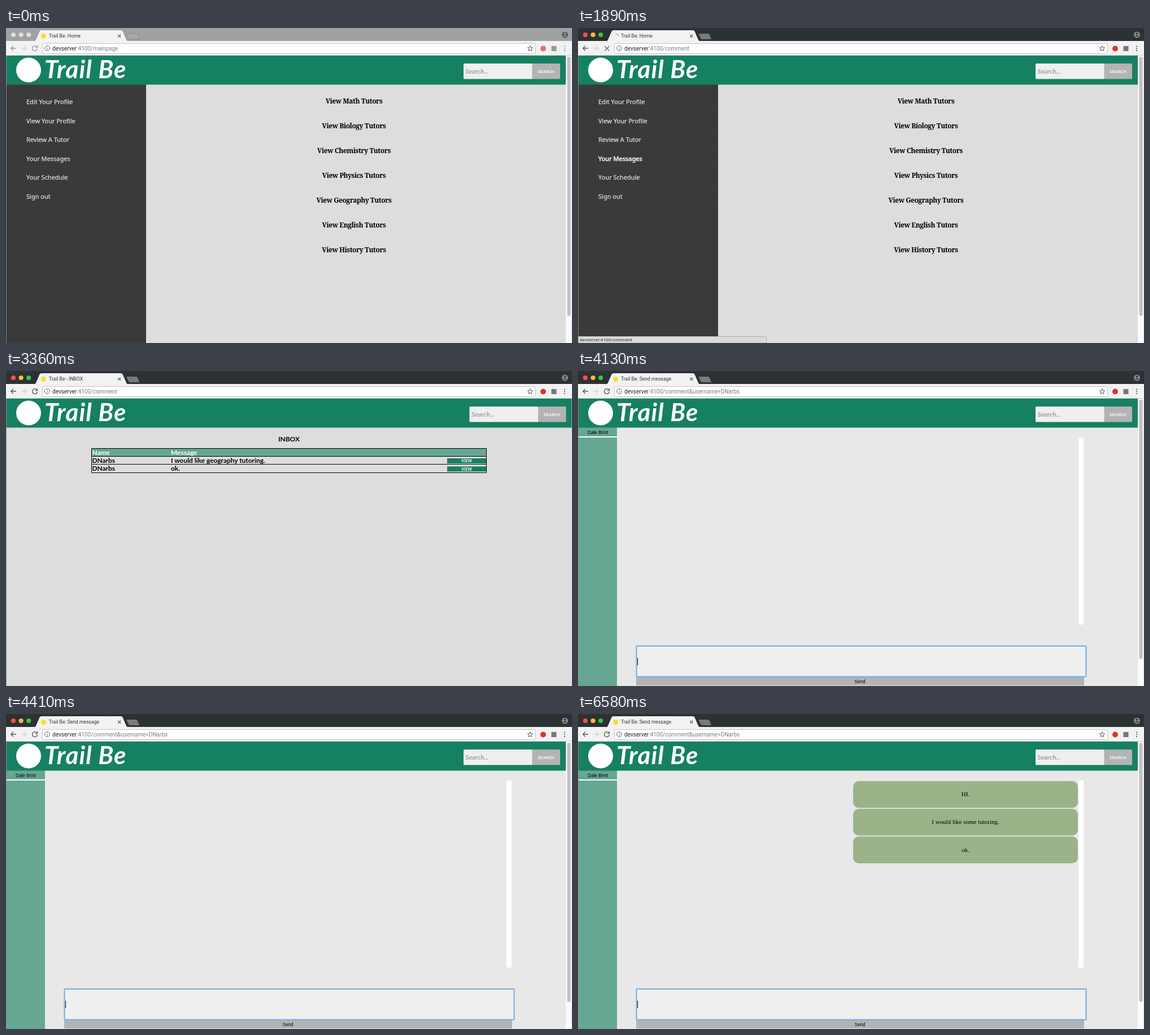
These frames come from a looping animation (1002 by 559 pixels, 6.65 s). An HTML page:

```html
<!DOCTYPE html>
<html lang="en">
<head>
<meta charset="utf-8">
<title>Tutoring site walkthrough</title>
<style>
  html, body { margin: 0; width: 100%; height: 100%; overflow: hidden; }
  svg { display: block; width: 100vw; height: 100vh; }
  .ui { font-family: Roboto, sans-serif; font-size: 8.6px; fill: #333; }
  .url { font-size: 10px; fill: #7d7d7d; }
  .menu { font: 500 11px "Noto Sans", sans-serif; }
  .menu text { fill: #dedede; stroke: #dedede; stroke-width: .25; }
  .menu text.hover { fill: #fff; stroke: #fff; stroke-width: .5; }
  .subject { font: 700 12px "Noto Serif", serif; letter-spacing: -.43px; }
  .table { font: 700 11.9px Lato, sans-serif; }
  .chat { font: 11px "Liberation Serif", serif; }
  .small { font: 8.2px "Liberation Sans", sans-serif; }
  .button { font: 700 7.3px Lato, sans-serif; fill: #fff; }
  .brand { font: italic 700 44px Lato, sans-serif; letter-spacing: 1px; fill: #fff; }
  .mid { text-anchor: middle; }
  .line { fill: none; stroke-width: 1.3; }
</style>
</head>
<body>
<svg viewBox="0 0 1002 559" preserveAspectRatio="none">
  <g id="home">
    <rect y="100" width="1002" height="459" fill="#ddd"/>
    <rect y="100" width="248" height="459" fill="#3a3a3a"/>
    <g id="menu" class="menu"></g>
    <g id="subjects" class="subject mid"></g>
  </g>

  <g id="inbox">
    <rect y="100" width="1002" height="459" fill="#ddd"/>
    <g class="table">
      <text class="mid" x="501" y="124.5">INBOX</text>
      <rect x="151" y="137" width="700" height="14.5" fill="#66a793"/>
      <path d="M151.5 137.5H850.5V180.5H151.5ZM151 151.5H851M151 165.5H851" fill="none" stroke="#000"/>
      <g fill="#fff"><text x="152.5" y="148.5">Name</text><text x="292" y="148.5">Message</text></g>
      <g id="letters"></g>
    </g>
  </g>

  <g id="chat">
    <rect y="100" width="1002" height="459" fill="#e8e8e8"/>
    <rect y="100" width="69" height="459" fill="#66a793"/>
    <rect y="116" width="69" height="2" fill="#fff"/>
    <text class="small mid" x="35" y="111.5">Dale Brint</text>
    <rect x="886" y="118" width="9" height="332" fill="#fff"/>
    <g id="bubbles" class="chat mid"></g>
    <rect x="103" y="543" width="793" height="15" fill="#b3b3b3"/>
    <text class="small mid" x="499" y="553.7">Send</text>
    <rect x="103.5" y="488" width="796" height="54.5" rx="1" fill="#efefef" stroke="#6caee8" stroke-width="2"/>
    <path id="caret" d="M105.5 509V522" stroke="#000"/>
  </g>

  <rect y="49" width="1002" height="51.5" fill="#168062"/>
  <circle cx="40" cy="74.5" r="22" fill="#fff"/>
  <text class="brand" x="68" y="89">Trail Be</text>
  <g id="search">
    <rect x="810" y="63" width="122" height="27.5" rx="1.5" fill="#efefef"/>
    <rect x="931.5" y="63" width="49.5" height="27.5" rx="1.5" fill="#b3b3b3"/>
    <text x="813.5" y="80.5" fill="#a0a0a0" style="font:italic 700 11.5px Lato,sans-serif">Search...</text>
    <text class="mid" x="956" y="79.8" fill="#fff" style="font:500 7.8px Roboto,sans-serif">SEARCH</text>
  </g>
  <g id="scrollbar">
    <rect x="991" y="49" width="11" height="510" fill="#fafafa"/>
    <rect x="993.5" y="51" width="6" height="460" rx="3" fill="#c1c1c1"/>
  </g>

  <rect id="titlebar" width="1002" height="24"/>
  <g id="lights"></g>
  <path id="newTab" d="M215 10H230Q232 10 233 12L236 20H219Q218 20 217 18L213.5 11Q213.5 10 215 10Z"/>
  <rect y="23" width="1002" height="26" fill="#f2f2f2"/>
  <path d="M0 48.5H1002" stroke="#cfcfcf"/>
  <path d="M50 23.5Q52 23 53 21L59 7Q60 4 63 4H203Q206 4 207 7L213 21Q214 23 216 23.5Z" fill="#f2f2f2"/>
  <circle id="favicon" cx="66.5" cy="14.5" r="4.5" fill="#f5df2e"/>
  <path id="spinner" class="line" d="M67 10A4.5 4.5 0 0 1 71.5 14.5" stroke="#aaa"/>
  <text id="title" class="ui" x="76" y="17.3"></text>
  <path class="line" d="M198.3 11.7L203.3 16.7M203.3 11.7L198.3 16.7" stroke="#666"/>
  <circle id="user" cx="989.5" cy="12" r="5.5"/>
  <path id="person" d="M986 15Q989.5 11 993 15ZM987.8 10A1.7 1.7 0 0 1 991.2 10A1.7 1.7 0 0 1 987.8 10Z"/>

  <g class="line">
    <path id="back" d="M18 36H9M13 31.8L8.8 36L13 40.2"/>
    <path d="M27 36H36M32 31.8L36.2 36L32 40.2" stroke="#d2d2d2"/>
    <path id="reload" d="M54.5 33.2A4.5 4.5 0 1 0 55.5 37M55.5 31V34.5H52"/>
    <path id="stop" d="M47 32L55.5 40.5M55.5 32L47 40.5" stroke="#666"/>
  </g>
  <rect x="64.5" y="27.5" width="873" height="18" rx="2" fill="#fff" stroke="#c4c4c4"/>
  <circle cx="73" cy="36" r="4.5" fill="none" stroke="#666"/>
  <path d="M73 35.3V38.8M73 33V34.3" stroke="#666"/>
  <text class="ui url" x="82" y="39.7"><tspan fill="#222">devserver</tspan><tspan id="path"></tspan></text>
  <path d="M928 31.5L929.3 34.7L932.7 35L930.1 37.2L930.9 40.5L928 38.7L925.1 40.5L925.9 37.2L923.3 35L926.7 34.7Z" fill="none" stroke="#555"/>
  <circle id="redIcon" cx="951" cy="36.5" r="5"/>
  <rect id="greyIcon" x="965.5" y="32" width="9" height="9"/>
  <g id="dots"><circle cx="989" cy="32.5" r="1.1"/><circle cx="989" cy="36.3" r="1.1"/><circle cx="989" cy="40.1" r="1.1"/></g>

  <g id="status">
    <path d="M0 547.5H331Q333.5 547.5 333.5 550V559H0Z" fill="#dadada" stroke="#b4b4b4"/>
    <text class="ui" x="3" y="556.2" style="font-size:8.1px">devserver:4100/comment</text>
  </g>
  <path d="M.5 49V559" stroke="#8d8d8d"/>
  <path d="M1001.5 49V559" stroke="#d0d0d0" opacity=".6"/>
</svg>

<script>
const LOOP = 6650;
const FOCUS = 1400, HOVER = 1470, LOAD = 1750, INBOX = 2030, CHAT = 3850, MESSAGES = 4550;
const CARET_PHASE = 150;

const $ = id => document.getElementById(id);
const show = (id, on) => $(id).style.display = on ? '' : 'none';
const paint = (id, color, attr = 'fill') => $(id).setAttribute(attr, color);
const write = (id, text) => { if ($(id).textContent !== text) $(id).textContent = text; };
const list = (id, items, draw) => $(id).innerHTML = items.map(draw).join('');

list('menu', ['Edit Your Profile', 'View Your Profile', 'Review A Tutor', 'Your Messages', 'Your Schedule', 'Sign out'],
  (label, i) => `<text x="36" y="${135.2 + 33.5 * i}">${label}</text>
    <path d="M32 ${Math.round(144 + 33.5 * i) + .5}H248" stroke="#424242" stroke-dasharray="3 1"/>`);

list('subjects', ['Math', 'Biology', 'Chemistry', 'Physics', 'Geography', 'English', 'History'],
  (name, i) => `<text x="616" y="${134 + 44 * i}">View ${name} Tutors</text>`);

list('letters', ['I would like geography tutoring.', 'ok.'], (text, i) => {
  const y = 163 + 14.4 * i;
  return `<text x="152.5" y="${y}">DNarbs</text><text x="292" y="${y}">${text}</text>
    <rect x="781" y="${y - 8}" width="69" height="9" fill="#168062"/>
    <text class="button mid" x="815.5" y="${y - .7}">VIEW</text>`;
});

list('bubbles', ['HI.', 'I would like some tutoring.', 'ok.'], (text, i) => {
  const y = 119 + 49.2 * i;
  return `<rect x="487" y="${y}" width="398" height="47.5" rx="10" fill="#9bb388"/>
    <text x="686" y="${y + 27.2}">${text}</text>`;
});

list('lights', ['#fc4f4b', '#fdbc2f', '#33c748'],
  (color, i) => `<circle cx="${13 + 13.6 * i}" cy="12" r="4.1" fill="${color}"/>`);
const lights = [...$('lights').children];
const lightColors = lights.map(light => light.getAttribute('fill'));
const messagesLink = $('menu').querySelectorAll('text')[3];

function render(t) {
  const focused = t >= FOCUS;
  const hovering = t >= HOVER && t < INBOX;
  const loading = t >= LOAD && t < INBOX;
  const page = t < INBOX ? 'home' : t < CHAT ? 'inbox' : 'chat';
  const barColor = focused ? '#2c3134' : '#9fa1a2';
  const iconColor = focused ? '#555' : '#999';

  for (const id of ['home', 'inbox', 'chat']) show(id, id === page);
  show('scrollbar', page !== 'inbox');
  $('search').setAttribute('transform', `translate(${page === 'inbox' ? 10.5 : 0})`);

  paint('titlebar', barColor);
  paint('person', barColor);
  paint('user', focused ? '#85898b' : '#5a5c5e');
  paint('newTab', focused ? '#777b7e' : '#a8aaab');
  paint('newTab', focused ? 'none' : '#858788', 'stroke');
  paint('back', iconColor, 'stroke');
  paint('reload', iconColor, 'stroke');
  paint('dots', iconColor);
  paint('redIcon', focused ? '#d8362f' : '#e2716c');
  paint('greyIcon', focused ? '#777' : '#999');
  lights.forEach((light, i) => light.setAttribute('fill', focused ? lightColors[i] : '#dedede'));

  write('title', { home: 'Trail Be: Home', inbox: 'Trail Be - INBOX', chat: 'Trail Be: Send message' }[page]);
  write('path', ':4100/' + (t < LOAD ? 'mainpage' : page === 'chat' ? 'comment&username=DNarbs' : 'comment'));

  show('favicon', !loading);
  show('spinner', loading);
  show('reload', !loading);
  show('stop', loading);
  $('spinner').setAttribute('transform', `rotate(${(t - 1890) * .36} 67 14.5)`);

  messagesLink.classList.toggle('hover', hovering);
  show('status', hovering);
  show('bubbles', t >= MESSAGES);
  show('caret', (t - CARET_PHASE) % 1000 < 500 || t < CHAT + 300);
}

const start = performance.now();
function tick() {
  render((performance.now() - start) % LOOP);
  requestAnimationFrame(tick);
}
tick();
</script>
</body>
</html>
```
